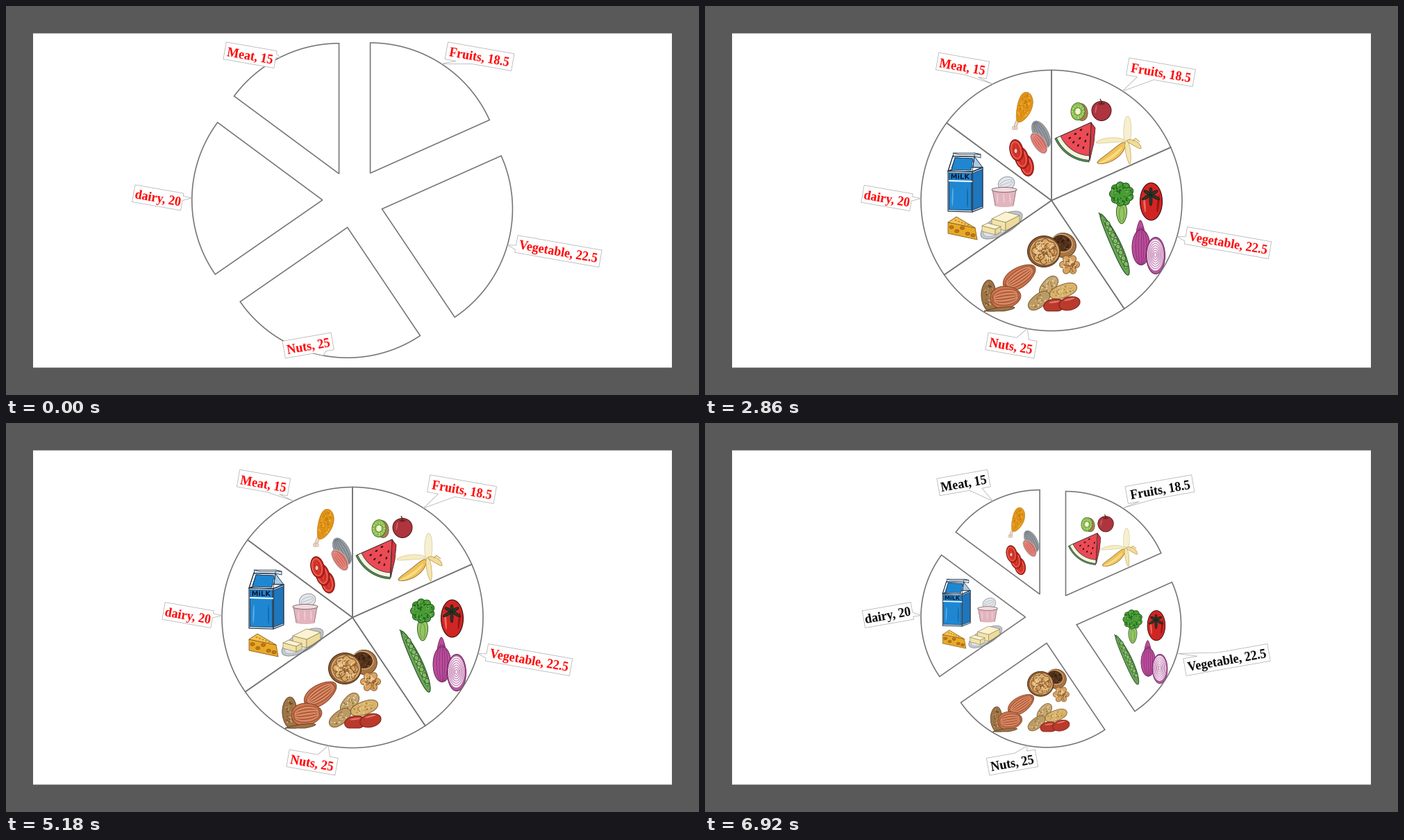
These frames come from a looping animation (998 by 561 pixels, 7500 ms). A matplotlib script:

```python
import matplotlib.pyplot as plt
import numpy as np
from matplotlib.animation import FuncAnimation
from matplotlib.collections import PathCollection
from matplotlib.patches import Polygon, Rectangle
from matplotlib.path import Path
from matplotlib.textpath import TextPath
from matplotlib.transforms import Affine2D

W, H, DPI = 998, 561, 100
PX = 72 / DPI
STEP, FIRST, HOLD, LOOP = 20, 540, 580, 7500
CX, CY, R = 499, 280.5, 188
TOP, BOTTOM, TILT = 52, 508, 10
rng = np.random.default_rng(4)

fig = plt.figure(figsize=(W / DPI, H / DPI), dpi=DPI, facecolor="#595959")
ax = fig.add_axes([0, 0, 1, 1])
ax.set_xlim(0, W)
ax.set_ylim(H, 0)
ax.axis("off")
ax.add_patch(Rectangle((39, 39.5), 920, 482, fc="white", lw=0, snap=False))


def turn(pts, deg, x=0, y=0):
    a = np.radians(deg)
    px, py = np.asarray(pts, float).T
    return np.column_stack([x + px * np.cos(a) - py * np.sin(a),
                            y + px * np.sin(a) + py * np.cos(a)])


def polar(x, y, r, deg):
    return x + r * np.cos(np.radians(deg)), y + r * np.sin(np.radians(deg))


class Sketch:
    """Collects filled shapes and strokes for one slice."""

    def __init__(self):
        self.paths, self.fc, self.ec, self.lw = [], [], [], []

    def put(self, path, fc, ec, lw):
        self.paths.append(path)
        self.fc.append(fc)
        self.ec.append(ec)
        self.lw.append(lw * PX if ec != "none" else 0)

    def poly(self, pts, fc, ec="none", lw=.8):
        pts = np.asarray(pts, float)
        self.put(Path(np.vstack([pts, pts[:1]]), closed=True), fc, ec, lw)

    def line(self, pts, ec, lw=.8):
        self.put(Path(np.asarray(pts, float)), "none", ec, lw)

    def pod(self, x, y, length, width, rot, fc, ec="none", lw=.9, taper=0, bend=0, waist=0):
        """An oval along rot: fatter at one end, bent, or pinched in the middle."""
        t = np.linspace(0, 2 * np.pi, 44, endpoint=False)
        u = np.cos(t)
        v = np.sin(t) * (1 + taper * u - waist * (1 - u * u))
        xy = np.column_stack([length / 2 * u, width / 2 * v + bend * (1 - u * u)])
        self.poly(turn(xy, rot, x, y), fc, ec, lw)

    def ray(self, x, y, length, width, rot, fc, ec="none", lw=.7, **shape):
        self.pod(*polar(x, y, length / 2, rot), length, width, rot, fc, ec, lw, **shape)

    def sector(self, x, y, r, a, b, fc, ec, lw=.8):
        t = np.linspace(a, b, 16)
        self.poly([(x, y), *np.column_stack(polar(x, y, r, t))], fc, ec, lw)

    def streaks(self, x, y, length, width, rot, ec, n=5, lw=.8):
        t = np.linspace(.25, np.pi - .25, 14)
        for k in np.linspace(-.75, .75, n):
            xy = np.column_stack([length / 2 * np.cos(t), k * width / 2 * np.sin(t)])
            self.line(turn(xy, rot, x, y), ec, lw)

    def scatter(self, x, y, length, width, rot, n):
        r, a = .92 * np.sqrt(rng.random(n)), rng.random(n) * 2 * np.pi
        return turn(np.column_stack([length / 2 * r * np.cos(a), width / 2 * r * np.sin(a)]), rot, x, y)

    def specks(self, x, y, length, width, rot, colors, n, size=2.5):
        for i, (sx, sy) in enumerate(self.scatter(x, y, length, width, rot, n)):
            s = size * rng.uniform(.6, 1.3)
            self.pod(sx, sy, s, s * .7, rng.uniform(0, 180), colors[i % len(colors)])

    def wrinkles(self, x, y, length, width, ec, n, lw=1):
        t = np.linspace(-1, 1, 9)
        wave = np.column_stack([3 * t, 1.4 * np.sin(3 * t)])
        for wx, wy in self.scatter(x, y, length, width, 0, n):
            self.line(turn(wave, rng.uniform(0, 180), wx, wy), ec, lw)

    def box(self, corner, across, back, drop, colors, ec, rim=0):
        """Slanted block: front, side and top face, each with an optional white rim."""
        p, a, b, h = (np.array(v, float) for v in (corner, across, back, (0, drop)))
        faces = [p, p + a, p + a + h, p + h], [p + a, p + a + b, p + a + b + h, p + a + h], \
                [p, p + a, p + a + b, p + b]
        for face, color in zip(faces, colors):
            if rim:
                self.poly(face, "white", ec, 1.2)
            mid = np.mean(face, axis=0)
            self.poly(mid + (np.array(face) - mid) * (1 - rim), color, ec)

    def word(self, x, y, text, size, color):
        p = TextPath((0, 0), text, size=size, prop={"family": "DejaVu Sans", "weight": "bold"})
        self.put(Path(p.vertices * [1, -1] + [x, y], p.codes), color, "none", 0)

    def collect(self):
        return PathCollection(self.paths, facecolors=self.fc, edgecolors=self.ec,
                              linewidths=self.lw, zorder=2)


def meat():
    s = Sketch()
    s.ray(451, 163, 15, 5, 112, "#ecdac6", "#b39a84", waist=.2)
    for x in (444.5, 448):
        s.pod(x, 176, 4.5, 5, 0, "#ecdac6", "#b39a84", .5)
    s.pod(458, 146, 45, 21, 107, "#e0941a", "#c07a10", .6, taper=-.2, bend=-2)
    s.specks(459, 145, 42, 18, 107, ["#c97b0a", "#f0b437", "#d98a0c"], 60, 2.8)
    # fish steak
    s.pod(484, 185, 42, 21, 62, "#989da2", "#73787d", .6)
    s.streaks(484, 185, 40, 18, 62, "#676d73", 5)
    s.pod(480.5, 198, 34, 17, 55, "#d4695f", "#bcc3c8", 1, bend=-1)
    s.streaks(480.5, 198, 30, 13, 55, "#eca89c", 4)
    # sliced red meat, back to front
    for i in range(3):
        x, y = 463.5 - 7.5 * i, 230 - 11 * i
        s.pod(x, y, 31, 19, 78, "#c9251d", "#6f120f")
        s.pod(x - .5, y, 25, 14, 78, "#dc382d", "#f0968a", .8)
        s.streaks(x, y, 18, 9, 78, "#b51d18", 2)
    s.pod(x - 1, y + 1, 5, 7, 0, "#f3c5b2", "#8f1c17", .7)
    return s


def fruits():
    s = Sketch()
    s.pod(542, 153, 25, 18, 80, "#a5824d", "#5b4526", .7)
    s.pod(537, 152, 25, 20, 95, "#8cc152", "#4d6a2c")
    s.pod(537, 152, 9, 7, 95, "#f4f5d6")
    for a in np.arange(0, 360, 30):
        s.line([polar(537, 152, 4, a), polar(537, 152, 9.5, a)], "#d3ec9b", .8)
        s.pod(*polar(537, 152, 5.5, a), 1.4, 1.2, a, "#2f3a18")
    # apple
    s.pod(571, 151.5, 28, 28, 90, "#ae343d", "#4b151a", 1, taper=-.06)
    s.ray(564, 143, 12, 2, 100, "#cc656b")
    s.pod(571, 141, 10, 3, 0, "#7c1f27")
    s.line([(571, 142), (571, 138), (569, 134)], "#3e2a1a", 1.3)
    # watermelon
    tip = 556, 168
    s.poly([tip, (562, 176), (560, 197), (554, 223)], "#d63540", "#3a2224")
    for r, color in ((57, "#4a9f4c"), (54.5, "#f4f4e2"), (48, "#ec4a55")):
        s.sector(*tip, r, 93, 156, color, "#33312c")
    for row in range(3):
        for a in np.linspace(107, 144, row + 2):
            s.pod(*polar(*tip, 18 + 10 * row, a), 4, 2.4, a, "#2a1517")
    # peeled banana
    s.ray(605, 194, 42, 7, 176, "#f5ecc3", "#d8c78b", bend=2)
    s.pod(585, 212, 49, 13, -36, "#efc158", "#85652a", .8, taper=.15, bend=4)
    s.pod(584, 215, 42, 4, -35, "#f9dc86", bend=3)
    s.ray(608, 200, 41, 11, -89, "#f6efd0", "#d6c88f")
    s.ray(607, 194, 34, 7, 82, "#f5e6b0", "#c0a050", taper=-.2)
    s.ray(608, 194, 23, 7, 30, "#f1dc9a", "#b48f3c", bend=-2)
    s.line([(616, 195), (620, 191), (626, 196)], "#c9a33d", 1.2)
    return s


def vegetables():
    s = Sketch()
    s.pod(600, 299, 30, 15, 90, "#94c563", "#345a22", taper=-.2)
    s.streaks(600, 300, 22, 9, 90, "#5f9140", 2)
    for a in np.arange(20, 380, 40):
        s.pod(600 + 11 * np.cos(np.radians(a)), 271 + 11 * np.sin(np.radians(a)),
              13, 12, a, "#479b35", "#1c4d17")
    s.pod(600, 271, 22, 20, 0, "#479b35")
    s.specks(600, 271, 32, 30, 0, ["#74bb52", "#236f1e", "#57a53f", "#1f5c1b"], 70, 2.8)
    # tomato
    s.pod(642.5, 282, 54, 32, 90, "#d02523", "#3a0d0c", 1.1)
    s.ray(632, 274, 24, 3, 85, "#ee6a5e")
    s.ray(654, 272, 26, 3, 96, "#971414")
    for a in np.arange(30, 390, 60):
        s.ray(642, 272, 13 + 3 * np.sin(np.radians(a)), 4, a, "#29382a", "#16170f")
    # pea pod
    s.pod(589.5, 344, 97, 14, 65.5, "#68a552", "#1d451f", 1, taper=.15, bend=-2)
    s.pod(591, 344, 78, 8, 65.5, "#a9d488", "#2c5c2a", .7, bend=-2)
    for u in np.linspace(-32, 32, 8):
        px, py = polar(593, 343, u, 65.5)
        s.pod(px, py, 7.5, 6.5, 65.5, "#86bd62", "#24522a")
    s.line([(567, 298), (571, 304)], "#34662e", 1.6)
    # onions
    s.ray(627, 338, 29, 11, -90, "#b94d9b", "#571c49", taper=-.4)
    s.pod(628, 348, 51, 26, 90, "#b94d9b", "#571c49")
    s.streaks(628, 346, 55, 21, 90, "#8b2d73", 5)
    s.pod(649, 360, 53, 27, 90, "#b5559f", "#571c49")
    for k in np.linspace(1, .15, 7):
        s.pod(648.5, 359, 46 * k, 24 * k, 90, "#fbf3f9", "#b86aa6")
    return s


def dairy():
    s = Sketch()
    ink, blue, shade = "#17304a", "#1f87d2", "#1f76bb"
    left, right, peak = (350, 238), (385, 239), (388, 217)
    s.poly([left, right, peak, (357, 216)], "white", ink, 1.2)
    s.poly([(355, 234), (382, 235), (385, 220), (360, 219)], blue, ink)
    s.poly([right, (400, 233), peak], "#a9cbe6", ink)
    s.box((357, 212), (31, 0), (9, 2), 5, ["#eef4f8", "#d8e4ee", "white"], ink)
    s.box(left, (35, 1), (15, -6), 58, [blue, shade, "white"], ink, rim=.08)
    s.poly([left, right, peak, (357, 216)], "none", ink)
    s.poly([(355, 236), (383, 237), (386, 220), (360, 219)], blue, ink)
    s.line([(351, 252), (385, 253)], "white", 2)
    s.word(353.5, 249.5, "MiLK", 10, "#0b1830")
    s.ray(357, 262, 27, 2, 92, "#63b0e6")
    s.ray(378, 262, 29, 2, 90, "#1668ad")
    # yogurt cup under a curled lid
    s.pod(434, 256, 24, 19, -20, "#e3e6ea", "#8b9097")
    s.streaks(434, 256, 20, 12, -20, "#b4bac2", 3)
    s.poly([(414, 265), (448, 265), (444, 288), (418, 288)], "#e2b4bd", "#85656d")
    s.pod(431, 288, 26, 4, 0, "#e2b4bd")
    s.pod(431, 265, 36, 7, 0, "#f3dcdf", "#77636a")
    for x in (421, 430, 439):
        s.ray(x, 270, 15, 2, 88, "#f0ced4")
    # cheese
    rind, nose, tail = (362, 304), (350, 312), (389, 320)
    s.poly([nose, tail, (392, 337), (350, 328)], "#e9a927", "#84581a")
    s.poly([nose, rind, tail], "#f4c453", "#84581a")
    for u in np.linspace(0, 1, 5):
        s.pod(355 + 31 * u, 319 + 10 * u + 4 * np.sin(9 * u), 6, 4.5, 0, "#bf7a18", "#7d4d10", .6)
        s.pod(361 + 18 * u, 309 + 7 * u, 3, 2, 0, "#c98a25")
    # butter dish
    s.pod(427, 316, 67, 27, -29, "#c3c8ce", "#858b93")
    s.pod(427, 316, 58, 20, -29, "#dfe2e6", "#a2a8b0", .6)
    cream = ["#f3e4ac", "#eddc9c", "#fbf3d2"]
    s.box((413, 307), (20, 5), (20, -10), 12, cream, "#998d62")
    s.box((399, 317), (19, 5), (8, -4), 8, cream, "#998d62")
    return s


def nuts():
    s = Sketch()
    # walnuts
    s.pod(516, 345, 37, 35, 20, "#a87442", "#55351c")
    s.pod(514, 342, 30, 25, 18, "#54331c", "#d1a673", 1.6)
    s.specks(514, 342, 27, 21, 18, ["#74492a", "#341d10"], 26, 3.5)
    s.pod(488, 354, 47, 45, 0, "#8a5a30", "#4a2c14", 1)
    s.pod(489, 354, 40, 37, 0, "#b98349", "#e6c795", 1.2)
    for a in np.arange(0, 360, 45):
        s.pod(*polar(489, 354, 11, a), 15, 12, a + 20, "#dba968", "#7d4f24", 1, waist=.2)
    s.wrinkles(489, 354, 34, 32, "#87552a", 20)
    s.wrinkles(489, 354, 34, 32, "#f3d6a2", 18, 1.2)
    for a in np.arange(0, 360, 60):
        s.pod(*polar(525, 373, 8, a), 13, 11, a, "#d6a362", "#8a5a2b", waist=.1)
    s.wrinkles(525, 373, 24, 20, "#8e5a29", 10)
    s.wrinkles(525, 373, 24, 20, "#f0d09a", 9, 1.2)
    # almonds, the lower one in its hull
    s.pod(411, 419, 48, 22, 84, "#9c7446", "#5f4123", bend=2)
    s.specks(410, 419, 40, 17, 84, ["#c8a36f", "#6f4b2a"], 40, 2.8)
    for x, y, length, width, rot in ((453, 391, 53, 28, -34), (433, 420, 44, 32, -8)):
        s.pod(x, y, length, width, rot, "#cc7550", "#7c3b20", taper=-.15)
        s.streaks(x, y, length - 3, width - 1, rot, "#934a2a", 6)
        s.streaks(x, y, length - 9, width - 7, rot, "#e8a682", 5)
    s.pod(424, 438, 44, 6, -8, "#9c7446", "#5f4123")
    # peanuts
    for x, y, length, rot, color in ((495, 404, 34, -50, "#c6a670"), (481, 425, 36, -38, "#bb9a63"),
                                     (516, 411, 41, -20, "#d9b268")):
        s.pod(x, y, length, 22, rot, color, "#77562c", waist=.15)
        s.specks(x, y, length - 3, 15, rot, ["#94713c", "#e8d2a2"], 34, 2.2)
    for x, y, rot in ((503, 432, -8), (525, 429, -14)):
        s.pod(x, y, 31, 19, rot, "#ba3a2c", "#6c1a14")
        s.ray(x - 8, y - 4, 16, 2.5, rot, "#e2796a")
    for p in s.paths:
        p.vertices[:] = np.minimum(p.vertices, [540, 440])
    return s


def bubble(w, h, tx, ty):
    """Callout outline of half size w, h; the tail leaves from the side facing the tip."""
    upright = abs(ty) * w > abs(tx) * h
    if upright:
        w, h, tx, ty = h, w, ty, tx
    sx, sy = np.copysign(1, tx), np.copysign(1, ty)
    pts = np.array([(sx * w, sy * h / 6), (tx, ty), (sx * w, sy * h * 2 / 3), (sx * w, sy * h),
                    (-sx * w, sy * h), (-sx * w, -sy * h), (sx * w, -sy * h)])
    return pts[:, ::-1] if upright else pts


class Slice:
    def __init__(self, start, name, value, gap, drift, joins, spot, width, art):
        a, b = np.radians(np.array([start, start + value]) * 360 / TOTAL)
        t = np.linspace(a, b, 60)
        self.shape = R * np.vstack([[0, 0], np.column_stack([np.sin(t), -np.cos(t)])])
        self.reach = R * np.array([np.sin((a + b) / 2), -np.cos((a + b) / 2)])
        self.gap, self.drift, self.joins = gap, drift, joins
        self.spot, self.width, self.late = np.array(spot), width, name == "Nuts"
        self.art = art().collect()
        self.thick = np.array(self.art.get_linewidths())
        ax.add_collection(self.art, autolim=False)
        self.edge = ax.add_patch(Polygon(self.shape, fc="none", ec="#767474", lw=1.6 * PX, zorder=3))
        self.box = ax.add_patch(Polygon(self.shape, fc="white", ec="#b3b3b3", lw=.8 * PX, zorder=4))
        self.text = ax.text(0, 0, f"{name}, {value}", family="Liberation Serif", weight="bold",
                            size=18 * PX, ha="center", va="center", zorder=5)

    def show(self, k):
        burst = k >= 6 and k % 2 == 0
        joined = k >= self.joins
        out = 0 if joined else self.gap + self.drift * min(k, 4.3 - k)
        size = .8 if burst else 1
        mid = np.array([CX, CY]) + (.2 if burst else out) * self.reach
        self.edge.set_xy(mid + self.shape * size)
        self.art.set_visible(joined)
        self.art.set_transform(Affine2D().translate(-CX, -CY).scale(size).translate(*mid)
                               + ax.transData)
        self.art.set_linewidths(self.thick * size)
        up = burst or k in (1, 3) or (k == 0 and self.late)
        self.label(out, -TILT if up else TILT, "black" if burst else "red")

    def label(self, out, tilt, color):
        w, h = self.width / 2, 12.5
        x, y = self.spot + out * self.reach
        if tilt < 0:
            x += 1.5 * np.sign(CX - x)
        a = np.radians(TILT)
        half = w * np.sin(a) + h * np.cos(a)
        y = np.clip(y, TOP + half, BOTTOM - half)
        tip = np.array([CX, CY]) + (1 + out) * self.reach
        tail = turn([tip - (x, y)], -tilt)[0]
        self.box.set_xy(turn(bubble(w, h, *tail), tilt, x, y))
        self.text.set_position(turn([(0, 2.2)], tilt, x, y)[0])
        self.text.set_rotation(-tilt)
        self.text.set_color(color)


# name, value, first gap, drift per step, step of joining, label centre, label width, art
DATA = [
    ("Fruits", 18.5, .25, 0, 5, (656.5, 95.5), 97, fruits),
    ("Vegetable", 22.5, .235, .108, 3, (753, 341.5), 123, vegetables),
    ("Nuts", 25, .21, 0, 2, (441, 489.5), 71, nuts),
    ("dairy", 20, .23, .135, 4, (262, 277), 71, dairy),
    ("Meat", 15, .23, 0, 1, (371, 86), 74, meat),
]
TOTAL = sum(row[1] for row in DATA)
slices, start = [], 0
for row in DATA:
    slices.append(Slice(start, *row))
    start += row[1]


def update(i):
    t = i * STEP
    k = 0 if t < FIRST else 1 + (t - FIRST) // HOLD
    for s in slices:
        s.show(k)


anim = FuncAnimation(fig, update, frames=LOOP // STEP, interval=STEP, repeat=True,
                     repeat_delay=0, init_func=lambda: update(0), cache_frame_data=False)
plt.show()
```
